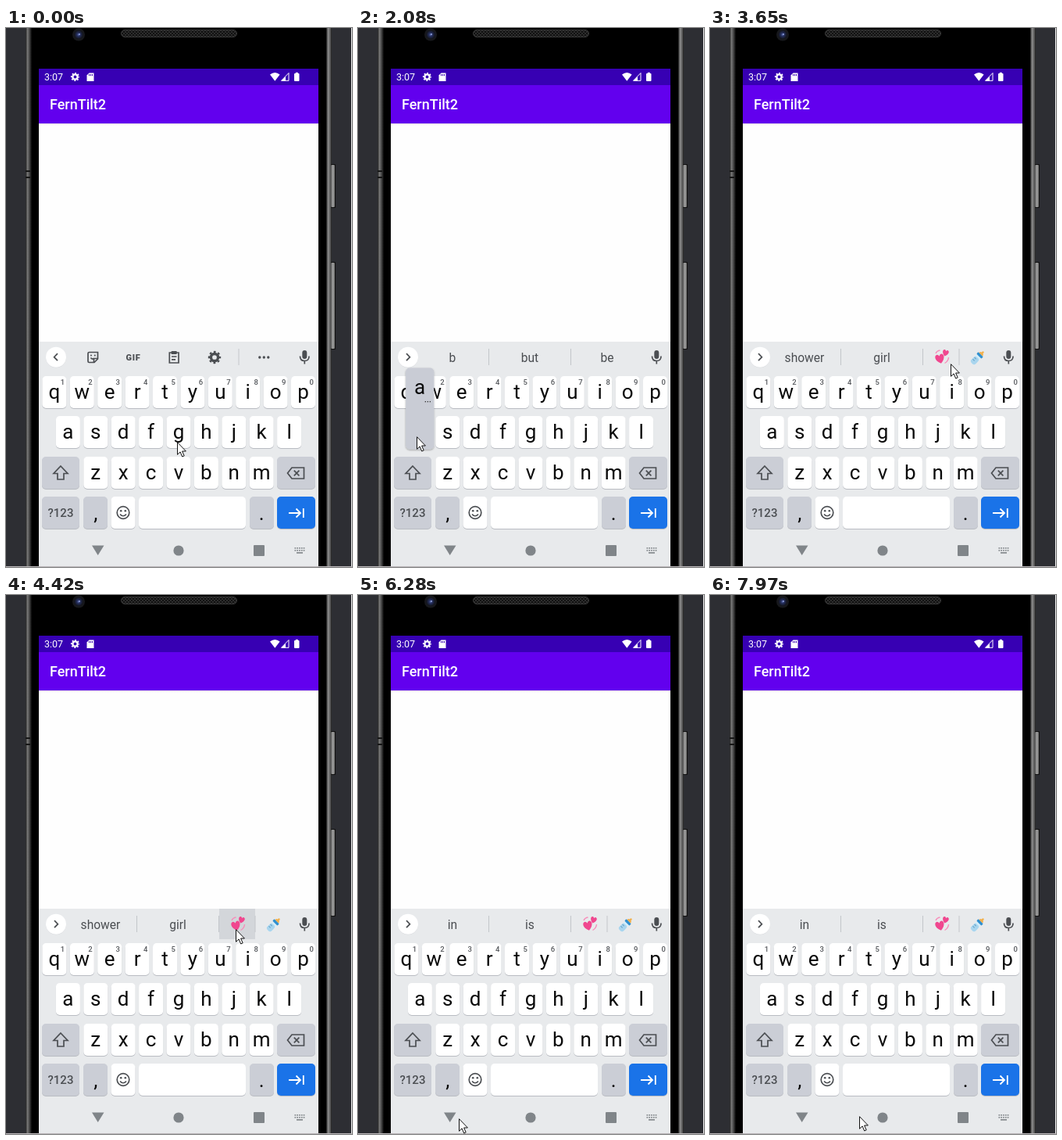
Write an HTML page that moves like this. It is 443 by 689 pixels and loops after 8 s.

```html
<!DOCTYPE html>
<html lang="en">
<head>
<meta charset="utf-8">
<title>Phone keyboard</title>
<style>
html, body { margin: 0; width: 100%; height: 100%; overflow: hidden; background: #2d2e33; }
svg { display: block; width: 100%; height: 100%; }
text { font-family: Roboto, "Open Sans", sans-serif; }
.mid { text-anchor: middle; }
.letter { font-size: 26px; fill: #0a0a0a; }
.hint { font-size: 9.5px; font-weight: 500; fill: #55585c; }
.word { font-size: 15.6px; fill: #4b4e52; }
.line { fill: none; stroke: #4b4e52; stroke-width: 1.7; }
</style>
</head>
<body>
<svg id="stage" viewBox="0 0 443 689">
  <defs>
    <linearGradient id="metal">
      <stop offset="0" stop-color="#1c1c1c"/>
      <stop offset=".3" stop-color="#777"/>
      <stop offset=".6" stop-color="#4c4c4c"/>
      <stop offset="1" stop-color="#050505"/>
    </linearGradient>
    <linearGradient id="rim">
      <stop offset="0" stop-color="#1a1a1a"/>
      <stop offset=".35" stop-color="#8a8a8a"/>
      <stop offset=".75" stop-color="#5c5c5c"/>
      <stop offset="1" stop-color="#161616"/>
    </linearGradient>
    <linearGradient id="button">
      <stop offset="0" stop-color="#5a5a5a"/>
      <stop offset=".5" stop-color="#a0a0a0"/>
      <stop offset="1" stop-color="#6a6a6a"/>
    </linearGradient>
    <linearGradient id="drop" x2="0" y2="1">
      <stop offset="0" stop-color="#e4e4e4"/>
      <stop offset="1" stop-color="#fefefe"/>
    </linearGradient>
    <radialGradient id="lens">
      <stop offset="0" stop-color="#5a6cae"/>
      <stop offset=".4" stop-color="#242e5c"/>
      <stop offset="1" stop-color="#12141c"/>
    </radialGradient>
    <pattern id="mesh" width="4" height="4" patternUnits="userSpaceOnUse">
      <rect width="4" height="4" fill="#111"/>
      <circle cx="1" cy="1" r=".9" fill="#3c3c3c"/>
      <circle cx="3" cy="3" r=".9" fill="#3c3c3c"/>
    </pattern>
    <filter id="soft" x="-20%" y="-10%" width="140%" height="120%">
      <feDropShadow dx="0" dy="1" stdDeviation="1.2" flood-opacity=".35"/>
    </filter>
    <path id="heart" d="M0 6C-8 0-6-6-3-6Q-1-6 0-3.6Q1-6 3-6C6-6 8 0 0 6Z"/>
  </defs>
  <g id="phone"></g>
  <g id="screen"></g>
  <g id="keyboard"></g>
  <g id="tools"></g>
  <g id="words"></g>
  <g id="popup"></g>
  <path id="cursor" d="M.5 .7V16.3L4.1 12.9L6.7 19L9.2 17.9L6.6 12H11.4Z" fill="#fff" stroke="#111" stroke-width="1"/>
</svg>
<script>
const LOOP = 8000;
const INK = '#4b4e52', GREY = '#cbced6';
const get = id => document.getElementById(id);

const rect = (x, y, w, h, fill, r = 0) =>
  `<rect x="${x}" y="${y}" width="${w}" height="${h}" rx="${r}" fill="${fill}"/>`;
const disc = (x, y, r, fill) => `<circle cx="${x}" cy="${y}" r="${r}" fill="${fill}"/>`;
const path = (d, fill) => `<path d="${d}" fill="${fill}"/>`;
const line = d => `<path class="line" d="${d}"/>`;
const label = (x, y, s, cls) => `<text x="${x}" y="${y}" class="mid ${cls}">${s}</text>`;
const divider = x => rect(x - 0.5, 410, 1, 21, '#c3c6ca');

// Ring with eight teeth around it
function gear(x, y, r, color) {
  const ring = (radius, width, dash = '') =>
    `<circle cx="${x}" cy="${y}" r="${radius}" fill="none" stroke="${color}" stroke-width="${width}" ${dash}/>`;
  const tooth = Math.PI * r * 0.85 / 8;
  return ring(r * 0.56, r * 0.42) +
    ring(r * 0.85, r * 0.3, `stroke-dasharray="${tooth}" stroke-dashoffset="${tooth / 2}"`);
}

function key(x, y, w, fill = '#fff') {
  return rect(x, y + 1, w, 41, '#b9bcc2', 5) + rect(x, y, w, 41, fill, 5);
}

function letterRow(letters, x, y, hints) {
  return [...letters].map((c, i) => {
    const cx = x + i * 35.4;
    return key(cx - 15.5, y, 31) + label(cx, y + 29, c, 'letter') +
      (hints ? label(cx + 10.6, y + 10.5, (i + 1) % 10, 'hint') : '');
  }).join('');
}

function drawPhone() {
  const sideButton = (y, h) => rect(416, y - 1, 6, h + 2, '#111', 1) + rect(416, y, 5, h, 'url(#button)', 1);
  return rect(0, 0, 443, 689, '#2d2e33') +
    rect(25, 0, 392, 689, '#000') +
    rect(25, 0, 8, 689, 'url(#metal)') + rect(410, 0, 7, 689, 'url(#rim)') +
    sideButton(175, 54) + sideButton(300, 110) +
    rect(25, 182, 6, 2, '#161616') + rect(25, 190, 6, 2, '#161616') +
    disc(93, 8.5, 8, '#17181c') + disc(93, 8.5, 5.5, 'url(#lens)') + disc(94, 8, 1, '#93a2dc') +
    `<rect x="147.5" y="2.5" width="148" height="9" rx="4.5" fill="url(#mesh)" stroke="#3a3a3a"/>` +
    rect(442, 0, 1, 689, '#f0f0f0') + rect(0, 688, 443, 1, '#b9b5b8');
}

function drawScreen() {
  return rect(42, 52, 358, 21, '#3700b3') + rect(42, 73, 358, 49, '#6200ee') +
    rect(42, 122, 358, 279, '#fefefe') + rect(42, 122, 358, 2, 'url(#drop)') +
    '<text x="49" y="67" font-size="12.5" fill="#fff">3:07</text>' +
    gear(88.5, 62.5, 5.6, '#fff') +
    path('M106.5 57.5H112.5V68H103.5V60.5Z', '#fff') +
    [106, 108, 110].map(x => rect(x, 59, 1, 2.2, '#3700b3')).join('') +
    path('M338 59.5Q344.3 54.5 350.6 59.5L344.3 67.8Z', '#fff') +
    '<path d="M362 57.5V67.3H352.5Z" fill="none" stroke="#fff"/>' +
    path('M358 62V67.5H352.5Z', '#fff') +
    rect(369, 58, 6.5, 10, '#fff', 1) + rect(370.8, 56.8, 3, 2, '#fff') +
    '<text x="56" y="104" font-size="18" font-weight="500" fill="#fff">FernTilt2</text>';
}

function drawKeyboard() {
  const dots = [0, 1, 2, 3, 4].map(i =>
    rect(369.5 + i * 2.8, 664, 1.7, 1.7, '#858a8e') + rect(369.5 + i * 2.8, 667, 1.7, 1.7, '#858a8e')).join('');
  return rect(42, 401, 358, 287, '#e8eaec') +
    letterRow('qwertyuiop', 61.9, 445, true) +
    letterRow('asdfghjkl', 79.4, 496) +
    letterRow('zxcvbnm', 114.8, 548) +
    key(46, 548, 48, GREY) + key(347, 548, 49, GREY) +
    line('M70 560L79 569.5H74V577H66V569.5H61Z') +
    line('M366 562H381.5V576H366L360.5 569Z') + line('M368.8 565.7L375.4 572.3M375.4 565.7L368.8 572.3') +
    key(46, 599, 48, GREY) +
    `<text x="70" y="625" class="mid" font-size="15" font-weight="500" fill="${INK}">?123</text>` +
    key(99, 599, 31, GREY) + label(114.8, 629, ',', 'letter') +
    key(134.5, 599, 31) +
    '<circle class="line" cx="150" cy="619.5" r="7.8"/>' +
    disc(147.2, 617.3, 1.3, INK) + disc(152.8, 617.3, 1.3, INK) +
    line('M146 621.5Q150 626 154 621.5') +
    key(170, 599, 137) +
    key(312, 599, 31, GREY) + label(327.3, 629, '.', 'letter') +
    key(347, 599, 49, '#1a73e8') +
    '<path d="M362 620H377M371.5 614.5L377 620L371.5 625.5M380.8 614V626" fill="none" stroke="#fff" stroke-width="1.8"/>' +
    path('M110 661.5H125.5L117.7 674Z', '#808589') +
    disc(221, 668, 6.6, '#808589') + rect(317, 661, 14, 14, '#808589', 1) +
    dots + rect(372, 670, 8, 1.7, '#858a8e') +
    rect(379.3, 412, 6, 11, INK, 3) + line('M376.5 419.5Q376.5 425.5 382.3 425.5T388 419.5M382.3 425.5V429.5') +
    disc(64, 421.2, 13, '#d6d8dc') + disc(64, 420.7, 13, '#fff');
}

function drawTools() {
  return line('M66 416.2L61.6 420.7L66 425.2') +
    line('M106.5 414.5H117.5V423L113 427.5H106.5Q105 427.5 105 426V416Q105 414.5 106.5 414.5Z') +
    line('M117.5 422.5H112.5V427.5') + line('M108.5 421.5Q110.5 424 112.5 422.5') +
    disc(109, 418.5, 1, INK) + disc(113.8, 418.5, 1, INK) +
    `<text x="163" y="424.5" class="mid" font-size="11" font-weight="800" letter-spacing=".8" fill="${INK}">GIF</text>` +
    line('M209.3 415H221V428H209.3Z') + rect(211.5, 413, 7.3, 4, INK, 1) +
    line('M212 420H218.5M212 423.8H217') +
    gear(267, 421, 8.2, INK) + divider(298) +
    [324.8, 330.3, 335.8].map(x => disc(x, 421, 1.7, INK)).join('');
}

function drawHearts() {
  const heart = (x, y, turn, size) =>
    `<use href="#heart" fill="#f0478f" transform="translate(${x} ${y}) rotate(${turn}) scale(${size})"/>`;
  return heart(294.5, 423, -14, 1) + heart(301.5, 415.5, 16, 0.68) +
    '<path d="M289 416Q290.5 412.5 294.5 412M305.5 421Q305 426 300.5 428.5" fill="none" stroke="#f78dba" stroke-width="1.4"/>';
}

function drawBottle() {
  return `<g transform="translate(342.5 421.5) rotate(45)">
    ${rect(-3.8, -3.5, 7.6, 13.5, '#d6edf8', 3)}${rect(-3.8, 0, 7.6, 10, '#a9d5ee', 3)}
    ${rect(-3, 2, 3, 1, '#5b9cc4')}${rect(-3, 5, 3, 1, '#5b9cc4')}
    ${rect(-4.4, -6, 8.8, 3.4, '#2f8fd0', 1)}
    ${path('M-3.2 -6Q-3 -8.5 -1.2 -8.7V-10.5Q0 -12 1.2 -10.5V-8.7Q3 -8.5 3.2 -6Z', '#f2b04c')}</g>`;
}

function drawWords([left, mid, right], pressed) {
  return (pressed ? rect(273, 401, pressed, 39, '#d3d6da') : '') +
    line('M62 416.2L66.4 420.7L62 425.2') + divider(167.5) + divider(272.5) +
    label(121, 427, left, 'word') + label(220, 427, mid, 'word') +
    (right ? label(319, 427, right, 'word') : drawHearts() + divider(319) + drawBottle());
}

function drawPopup(char) {
  const [x, y] = char === 'b' ? [256.4, 486.5] : [79.2, 434.5];
  return `<g filter="url(#soft)">${rect(x - 18, y, 36, 104, '#c9ccd5', 5)}</g>` +
    label(x, y + 33.5, char, 'letter') +
    (char === 'a' ? [6.5, 9.5, 12.5].map(d => rect(x + d, y + 42.5, 1.3, 1.3, '#333')).join('') : '');
}

// [time, x, y]; no position means hidden
const moves = [
  [0, 219, 529], [120, 228, 540], [240, 250, 570], [360, 255, 571],
  [1580, 215, 548], [1710, 110, 526], [1830, 75, 522],
  [2470, 95, 515], [2590, 150, 490], [2710, 230, 458], [2840, 285, 437], [2960, 304, 430], [3080, 308, 429],
  [3900, 302, 428], [4020, 297, 427], [4140, 294, 427], [4940, 305, 464], [5090],
  [5460, 276, 679], [5620, 249, 664], [5770, 205, 665], [5890, 160, 667], [6010, 136, 667],
  [6160, 132, 668], [6280, 129, 669], [7040, 250, 662], [7160, 341, 650],
  [7450, 354, 560], [7570, 318, 519], [7700, 245, 566], [7820, 204, 629], [7970, 191, 666]
];
const popups = [[0], [1200, 'b'], [1460], [2080, 'a'], [2350]];
// [time, words, width of pressed slot]
const bars = [
  [0], [1460, ['b', 'but', 'be']], [2350, ['back', 'bad', 'baby']], [3370, ['back', 'bad', 'baby'], 93],
  [3650, ['shower', 'girl']], [4420, ['shower', 'girl'], 46], [4680, ['in', 'is']]
];
const at = (list, t) => list.findLast(step => step[0] <= t);

get('phone').innerHTML = drawPhone();
get('screen').innerHTML = drawScreen();
get('keyboard').innerHTML = drawKeyboard();
get('tools').innerHTML = drawTools();

let shownBar, shownPopup;
function render(t) {
  const [, x, y] = at(moves, t);
  get('cursor').setAttribute('visibility', x === undefined ? 'hidden' : 'visible');
  if (x !== undefined) get('cursor').setAttribute('transform', `translate(${x} ${y})`);

  const bar = at(bars, t);
  if (bar !== shownBar) {
    shownBar = bar;
    get('tools').setAttribute('visibility', bar[1] ? 'hidden' : 'visible');
    get('words').innerHTML = bar[1] ? drawWords(bar[1], bar[2]) : '';
  }
  const popup = at(popups, t);
  if (popup !== shownPopup) {
    shownPopup = popup;
    get('popup').innerHTML = popup[1] ? drawPopup(popup[1]) : '';
  }
}

const start = performance.now();
function tick() {
  render((performance.now() - start) % LOOP);
  requestAnimationFrame(tick);
}
tick();
</script>
</body>
</html>
```
